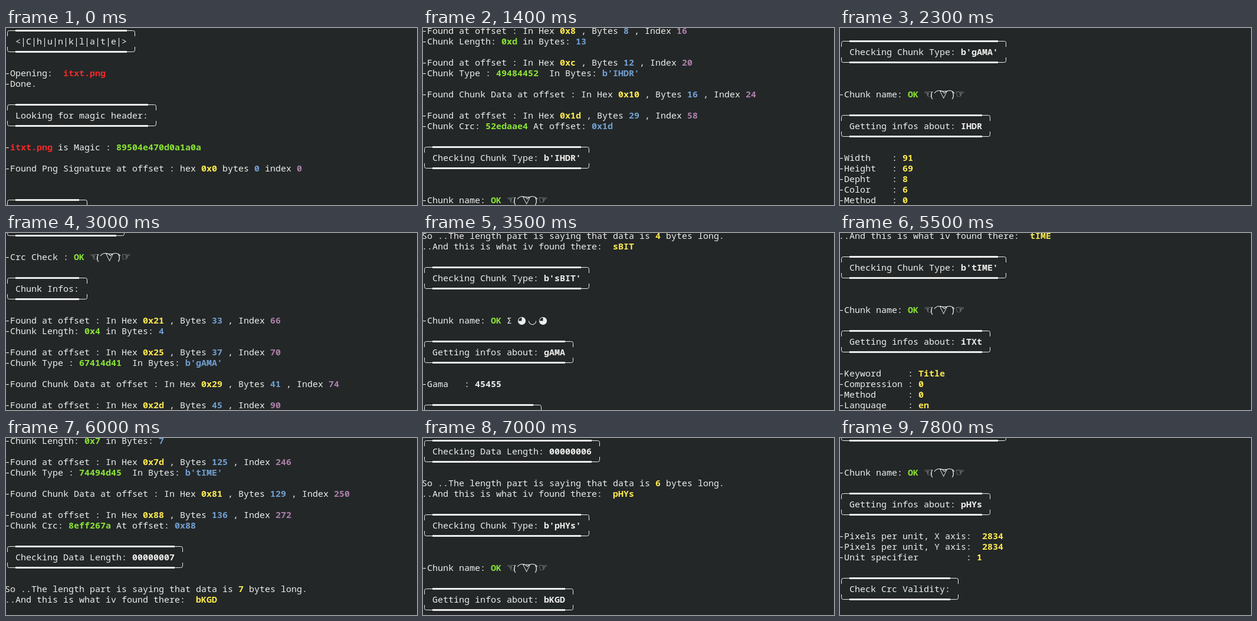
These frames come from a looping animation (697 px wide and 301 px high, 8000 ms). An HTML page:

```html
<!DOCTYPE html>
<html lang="en">
<head>
<meta charset="utf-8">
<title>Chunk log</title>
<style>
  html, body { margin: 0; width: 100%; height: 100%; overflow: hidden; background: #232728; }
  #stage { position: relative; width: 697px; height: 301px; overflow: hidden; }
  #log {
    position: absolute; left: -2px; top: -4px; width: 720px;
    font: 15px/18px "Noto Sans Mono", "DejaVu Sans Mono", monospace;
    font-variant-ligatures: none; color: #eeeeec; white-space: pre;
  }
  .row { position: relative; height: 18px; }
  .row > p { margin: 0; position: relative; top: -1px; height: 18px; }
  .box { position: relative; height: 54px; }
  .box svg { position: absolute; left: 0; top: 0; }
  .box p { position: absolute; left: 18px; top: 17px; margin: 0; }
  b { font-weight: 700; }
  .r { color: #ef2929; }
  .g { color: #8ae234; }
  .y { color: #fce94f; }
  .b { color: #729fcf; }
  .p { color: #ad7fa8; }
  .sym { position: absolute; top: 0; font: 17.3px/18px "DejaVu Sans", sans-serif; }
  .arcs { position: absolute; left: 0; top: 0; }
</style>
</head>
<body>
<div id="stage"><div id="log"></div></div>
<script>
const ROW = 18, COL = 9, LOOP = 8000;
const html = [];

const paint = (color, text) => `<b class="${color}">${text}</b>`;
const bold = text => paint('w', text);
const hex = n => '0x' + n.toString(16);
const line = (text = '') => html.push(`<div class="row"><p>${text}</p></div>`);
const blank = (count = 1) => { while (count--) line(); };

function box(label, value = '') {
  const plain = label + value;
  const end = 18 + plain.length * COL, right = end + 13.5;
  const corners = (from, to, y) => {
    const bend = from > y ? y + 3 : y - 3;
    return `M4.5 ${from}V${bend}Q4.5 ${y} 7.5 ${y}H18M${right} ${from}V${bend}Q${right} ${y} ${right - 3} ${y}H${end}`;
  };
  const safe = label.replace(/</g, '&lt;').replace(/>/g, '&gt;');
  html.push(`<div class="box"><svg width="${end + 20}" height="54">
    <path d="${corners(18, 0, 8.5)}${corners(36, 0, 44.5)}" fill="none" stroke="#eeeeec"/>
    <path d="M18 7H${end}V10H18zM18 43H${end}V46H18z" fill="#eeeeec"/></svg><p>${safe}${value && bold(value)}</p></div>`);
}

const sym = (col, glyph) => `<span class="sym" style="left:${col * COL}px">${glyph}</span>`;
const arc = x => `M${x} 8Q${x + 3} 3.5 ${x + 8.5} 3.5T${x + 17} 8`;
const cheer = sym(16, '☜') + ' (   )' + sym(19, '▽') + sym(22, '☞') +
  `<svg class="arcs" width="220" height="18"><path d="${arc(162)}${arc(179)}" fill="none" stroke="#eeeeec" stroke-width="1.2"/></svg>`;
const stare = 'Σ' + sym(18, '◕') + sym(20, '◡') + sym(22, '◕');

const place = (lead, at, index) =>
  line(`${lead} at offset : In Hex ${paint('y', hex(at))} , Bytes ${paint('b', at)} , Index ${paint('p', index)}`);

function checkType(type, face = cheer) {
  box('Checking Chunk Type: ', `b'${type}'`);
  blank(2);
  line(`-Chunk name: ${paint('g', 'OK')} ${face}`);
  blank();
}

function chunk({ type, at, size, crc, next, face, infos }) {
  const code = [...type].map(c => c.charCodeAt(0).toString(16)).join('');
  const crcAt = at + 8 + size;
  box('Chunk Infos:');
  blank();
  place('-Found', at, at * 2);
  line(`-Chunk Length: ${paint('g', hex(size))} in Bytes: ${paint('b', size)}`);
  blank();
  place('-Found', at + 4, at * 2 + 4);
  line(`-Chunk Type : ${paint('g', code)}  In Bytes: ${paint('b', `b'${type}'`)}`);
  blank();
  place('-Found Chunk Data', at + 8, at * 2 + 8);
  blank();
  place('-Found', crcAt, crcAt * 2);
  line(`-Chunk Crc: ${paint('g', crc)} At offset: ${paint('b', hex(crcAt))}`);
  blank();
  if (type === 'IHDR') checkType(type);
  box('Checking Data Length: ', size.toString(16).padStart(8, '0'));
  blank();
  line(`So ..The length part is saying that data is ${paint('y', size)} bytes long.`);
  line(`..And this is what iv found there:  ${paint('y', next)}`);
  blank();
  checkType(next, face);
  box('Getting infos about: ', type);
  blank();
  infos.forEach(info => line(info));
  blank();
  box('Check Crc Validity:');
  blank();
  line(`-Crc Check : ${paint('g', 'OK')} ${cheer}`);
  blank();
}

// "-Name   : value" rows with the colon in a fixed column
const field = (name, width, value, color = 'y') => `-${name}`.padEnd(width) + `: ${paint(color, value)}`;
const fields = (width, values) => Object.entries(values).map(([name, value]) => field(name, width, value));

box('<|C|h|u|n|k|l|a|t|e|>');
blank();
line(`-Opening:  ${paint('r', 'itxt.png')}`);
line('-Done.');
blank();
box('Looking for magic header:');
blank();
line(`-${paint('r', 'itxt.png')} is Magic : ${paint('g', '89504e470d0a1a0a')}`);
blank();
line(`-Found Png Signature at offset : hex ${paint('y', '0x0')} bytes ${paint('b', 0)} index ${paint('p', 0)}`);
blank(2);

chunk({ type: 'IHDR', at: 8, size: 13, crc: '52edaae4', next: 'gAMA',
  infos: fields(10, { Width: 91, Height: 69, Depht: 8, Color: 6, Method: 0, Filter: 0, Interlace: 0 }) });
chunk({ type: 'gAMA', at: 33, size: 4, crc: '0bfc6105', next: 'sBIT', face: stare,
  infos: [field('Gama', 8, 45455, 'w')] });
chunk({ type: 'sBIT', at: 49, size: 4, crc: '4db7d2a1', next: 'iTXt',
  infos: [['Alpha Red', 'r'], ['Alpha Green', 'g'], ['Alpha Blue', 'b'], ['Alpha', 'w']]
    .map(([name, color]) => field(`significant bits ${name}`, 31, 5, color)) });
chunk({ type: 'iTXt', at: 65, size: 44, crc: 'a91c60f3', next: 'tIME',
  infos: fields(13, { Keyword: 'Title', Compression: 0, Method: 0, Language: 'en', Text: 'PNG' }) });
chunk({ type: 'tIME', at: 121, size: 7, crc: '8eff267a', next: 'bKGD',
  infos: fields(10, { Year: 2012, Month: 6, Day: 14, Hour: 10, Minute: 32, Second: 8 }) });
chunk({ type: 'bKGD', at: 140, size: 6, crc: 'a0bda793', next: 'pHYs',
  infos: fields(10, { Red: 255, Green: 255, Blue: 255 }) });
chunk({ type: 'pHYs', at: 158, size: 9, crc: '0b130b12', next: 'IDAT',
  infos: [
    `-Pixels per unit, X axis:  ${paint('y', 2834)}`,
    `-Pixels per unit, Y axis:  ${paint('y', 2834)}`,
    field('Unit specifier', 24, 1),
  ] });

const log = document.getElementById('log');
log.innerHTML = html.join('');

// Bursts of output: start time, step in ms, then the top row after each step
const bursts = [
  [0, 300, 0, 4, 8, 13],
  [1400, 200, 20, 24, 28],
  [2100, 100, 34, 39, 44],
  [2700, 100, 49, 54, 60, 66],
  [3200, 100, 71, 77, 83, 89],
  [3900, 100, 98, 107, 116],
  [4400, 100, 126, 136, 145],
  [5000, 100, 155, 165],
  [5500, 100, 175, 185, 196],
  [6000, 100, 205, 214, 223, 232],
  [6600, 100, 240, 252],
  [7000, 100, 261, 270, 280],
  [7600, 100, 291, 302, 313],
];

function topRow(time) {
  const [start, step, ...tops] = bursts.findLast(([from]) => from <= time);
  return tops[Math.min(tops.length - 1, Math.floor((time - start) / step))];
}

function draw() {
  log.style.transform = `translateY(${-ROW * topRow(performance.now() % LOOP)}px)`;
  requestAnimationFrame(draw);
}
draw();
</script>
</body>
</html>
```
